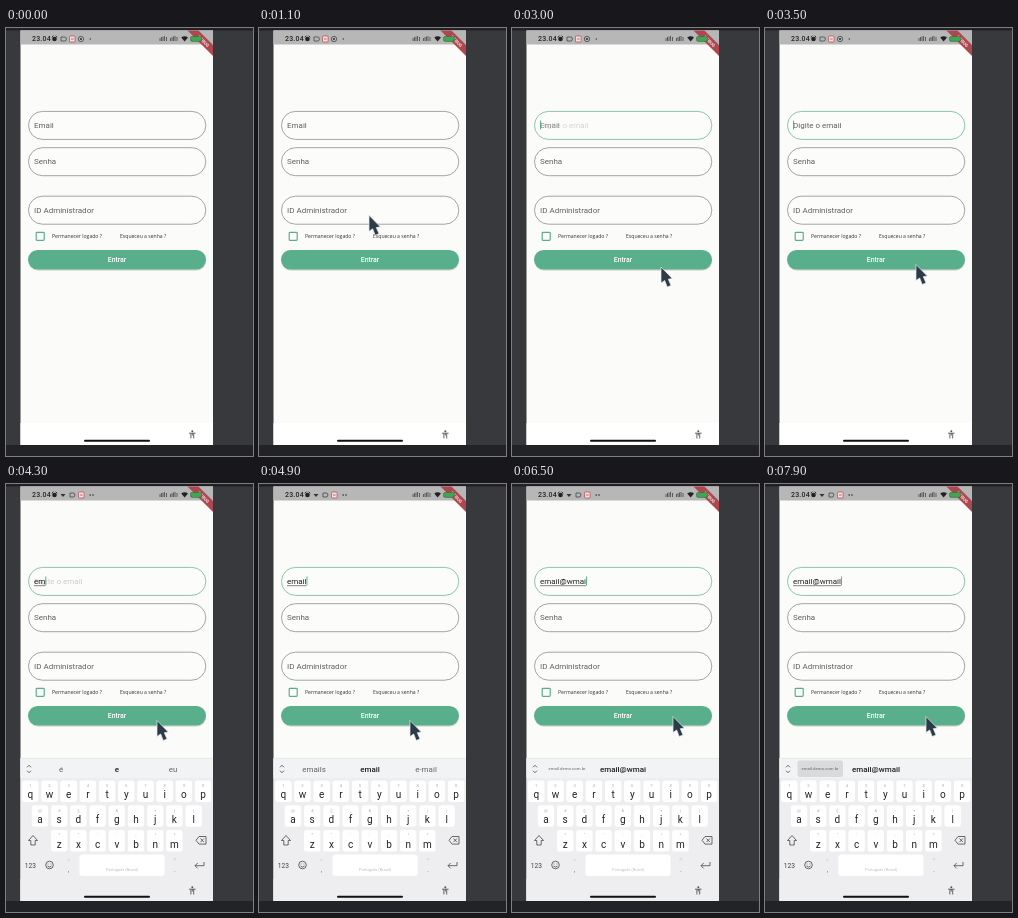
Write an HTML page that moves like this. It is 247 px wide and 428 px high and loops after 8000 ms.

```html
<!DOCTYPE html>
<html lang="pt">
<head>
<meta charset="utf-8">
<style>
html, body { margin: 0; width: 100%; height: 100%; overflow: hidden; background: #38393c; }
svg { display: block; width: 247px; height: 428px; font-family: Roboto, Arial, sans-serif; }
text { white-space: pre; }
.mid { text-anchor: middle; }
.line { fill: none; stroke: #45474a; stroke-width: .8; }
</style>
</head>
<body>
<svg viewBox="0 0 247 428">
  <defs><clipPath id="screen"><rect x="14.5" y="2.5" width="192.5" height="414.5"/></clipPath></defs>
  <rect width="247" height="428" fill="#38393c"/>
  <rect width="247" height="2.5" fill="#202124"/>
  <rect y="417" width="247" height="11" fill="#222326"/>
  <g clip-path="url(#screen)">
    <rect x="14" y="2" width="193" height="416" fill="#fbfbf9"/>
    <rect x="14" y="395" width="193" height="23" fill="#fff"/>
    <rect x="14" y="2" width="193" height="14.5" fill="#b7b7b7"/>
    <text x="26" y="13" font-size="7" font-weight="500" fill="#222" letter-spacing=".2">23.04</text>
    <g fill="#222">
      <circle cx="48.5" cy="11" r="2.3"/>
      <path d="M45.8 9.3l1.6-1.5M51.2 9.3l-1.6-1.5" stroke="#222"/>
    </g>
    <g id="iconsA">
      <path class="line" d="M55 9h4.5l1 2-1 2H55z"/>
      <rect x="63.5" y="8" width="5.6" height="6" rx=".8" fill="#f3dcdc" stroke="#b4494e" stroke-width=".7"/>
      <path d="M65 11h2.6" stroke="#b4494e" stroke-width=".8"/>
      <circle class="line" cx="75" cy="11" r="2.7"/><circle cx="75" cy="11" r="1.1" fill="#333"/>
      <circle cx="84.3" cy="11" r=".8" fill="#444"/>
    </g>
    <g id="iconsB">
      <path d="M54.5 10h5l-2.5 3z" fill="#333"/>
      <path class="line" d="M64 9h4l1 2-1 2h-4z"/>
      <rect x="72.5" y="8" width="5.6" height="6" rx=".8" fill="#f3dcdc" stroke="#b4494e" stroke-width=".7"/>
      <path d="M74 11h2.6" stroke="#b4494e" stroke-width=".8"/>
      <path d="M83.5 11h1.4m1.4 0h1.4" stroke="#444" stroke-width="1.4"/>
    </g>
    <path d="M154 13v-3m1.5 3v-4m1.5 4v-4.5m1.5 4.5v-5m2 5v-4M164.5 13v-3m1.5 3v-4m1.5 4v-4.5m1.5 4.5v-5m2 5v-4" stroke="#444" stroke-width=".8"/>
    <path d="M175.2 9.6q3.4-2.8 6.8 0l-3.4 4z" fill="#222"/>
    <path d="M181 2h11l15 15v11z" fill="#ad4750"/>
    <text class="mid" transform="translate(197.5 13.2) rotate(45)" y="1.6" font-size="4.5" font-weight="700" fill="#f0dede">DEBUG</text>
    <rect x="184.5" y="8.4" width="11" height="5" rx="1.6" fill="#43a452" stroke="#2d5a35" stroke-width=".5"/>

    <g id="fields"></g>
    <g font-size="8" fill="#5f6162">
      <text id="label" x="28" y="100">Email</text>
      <text id="hint" x="28" y="100">Digite o email</text>
      <text x="28" y="136.3">Senha</text>
      <text x="28" y="184.8">ID Administrador</text>
      <text id="typed" x="28" y="100" fill="#222"></text>
    </g>
    <path id="underline" stroke="#333" stroke-width=".6"/>
    <path id="caret" stroke="#4fa684" stroke-width=".9"/>
    <rect x="30.2" y="204.3" width="8" height="8" rx=".8" fill="#fff" stroke="#58ae8b" stroke-width="1.2"/>
    <g font-family="'Open Sans', Arial, sans-serif" font-size="5.1" fill="#333">
      <text x="46" y="210.3">Permanecer logado ?</text>
      <text x="114" y="210.3">Esqueceu a senha ?</text>
    </g>
    <rect x="22.5" y="223.5" width="177.5" height="19.3" rx="9.6" fill="#000" opacity=".14"/>
    <rect x="22" y="222" width="178" height="19.5" rx="9.7" fill="#59ae8b"/>
    <text class="mid" x="111" y="234.4" font-size="6.9" font-weight="500" fill="#fff">Entrar</text>

    <g id="keyboard">
      <rect x="14" y="274" width="193" height="144" fill="#eeeef0"/>
      <rect x="14" y="274" width="193" height="20" fill="#f2f3f4"/>
      <path d="M14 274.3h193" stroke="#dcdddf" stroke-width=".6"/>
      <path class="line" d="M21 283.3l2-2 2 2m-4 3.4l2 2 2-2"/>
      <rect id="pick" x="32.5" y="276.5" width="45.5" height="16.5" rx="2" fill="#d9dadc"/>
      <g class="mid" font-size="8">
        <text id="left" x="55" fill="#666"></text>
        <text id="center" x="111" y="287.6" font-weight="500" fill="#222"></text>
        <text id="right" x="167" y="287.6" fill="#666"></text>
      </g>
      <g id="keys"></g>
      <path class="line" d="M27 351.5l4.5 5h-2.3v4.5h-4.4v-4.5h-2.3z"/>
      <path class="line" d="M190 356.3l3-3.8h7v7.6h-7zM194.5 354.5l3.4 3.6m0-3.6l-3.4 3.6"/>
      <text class="mid" x="24.3" y="383.8" font-size="6.6" fill="#444">123</text>
      <circle class="line" cx="43.5" cy="381" r="3.8"/>
      <path class="line" d="M41.5 382q2 2.2 4 0M42.1 379.6v.8m2.8-.8v.8"/>
      <rect x="73.5" y="370.5" width="85" height="21.5" rx="3" fill="#fff"/>
      <text class="mid" x="116" y="387" font-size="4" fill="#bbb">Português (Brasil)</text>
      <g class="mid" font-size="7" fill="#777"><text x="62.5" y="388">,</text><text x="169" y="388">.</text></g>
      <g class="mid" font-size="4" fill="#bbb"><text x="62.5" y="377">☺</text><text x="169" y="377">!?</text></g>
      <path class="line" d="M198 378v3.7h-9m2.7-2.7l-2.7 2.7 2.7 2.7"/>
      <g id="popup">
        <rect x="34" y="271.5" width="19" height="47" rx="3" fill="#fff" stroke="#d5d6d8" stroke-width=".5"/>
        <text class="mid" x="43.5" y="288" font-size="11" fill="#222">w</text>
      </g>
    </g>
    <path d="M79 412.7h64" stroke="#111" stroke-width="2" stroke-linecap="round"/>
    <circle cx="186.3" cy="403.2" r="1" fill="#555"/>
    <path d="M183 405.2h6.6M186.3 405v2.5m-1.4 3v-5m2.8 5v-5" fill="none" stroke="#555" stroke-width=".9"/>
  </g>
  <path id="cursor" d="M0 0V16L3.7 13.5 6.2 20 10 18.5 7.3 12.2 11.3 11.5Z" fill="#2d3b49" stroke="#e9eeee" stroke-width=".7" stroke-linejoin="round"/>
</svg>
<script>
const LOOP = 8000, STEP = 100;
const el = id => document.getElementById(id);

const field = (y, id = '') =>
  `<rect id="${id}" x="22.5" y="${y}" width="177.3" height="28" rx="14" fill="#fcfdfb" stroke="#85888a" stroke-width=".75"/>`;
el('fields').innerHTML = field(83.4, 'email') + field(119.7) + field(168.2);

const rows = [
  ['qwertyuiop', '1234567890', 24.3, 296.5],
  ['asdfghjkl', '@#$_&-+()', 34, 321.3],
  ['zxcvbnm', '*"\':;!?', 53.2, 346]
];
el('keys').innerHTML = rows.map(([letters, marks, x0, y]) => [...letters].map((c, i) => {
  const x = x0 + i * 19.2;
  return `<rect x="${x - 8.2}" y="${y}" width="16.4" height="21.5" rx="2.8" fill="#fff"/>
    <text class="mid" x="${x}" y="${y + 6.2}" font-size="4.2" fill="#aaa">${marks[i]}</text>
    <text class="mid" x="${x}" y="${y + 17.5}" font-size="10" fill="#222">${c}</text>`;
}).join('')).join('');

// time, x, y of the pointer tip
const path = [[700, 50, 0], [1000, 90, 150], [1300, 150, 262], [1400, 184, 266], [1500, 173, 246],
  [1600, 155, 239], [1700, 149, 239], [3000, 149, 239], [3300, 151, 236.5], [6000, 151, 236.5], [6300, 161, 232.5]];

// time, typed text, suggestions
const typing = [
  [0, '', 'o', 'is', 'e'],
  [4300, 'em', 'é', 'e', 'eu'],
  [4500, 'ema', 'em', 'ema', 'emas'],
  [4700, 'emai', 'ema', 'emai', 'email'],
  [4900, 'email', 'emails', 'email', 'e-mail'],
  [5300, 'email@', 'o', 'is', 'e'],
  [6100, 'email@w', '', 'email@w', ''],
  [6300, 'email@wm', '', 'email@wm', ''],
  [6500, 'email@wmai', 'email.demo.com.br', 'email@wmai', ''],
  [6700, 'email@wmail', 'email.demo.com.br', 'email@wmail', '']
];

const ramp = (t, a, b) => Math.min(1, Math.max(0, (t - a) / (b - a)));
const lastAt = (list, t) => list.filter(k => k[0] <= t).pop();
const show = (id, on) => el(id).setAttribute('opacity', +on);

function pointerAt(t) {
  const a = lastAt(path, t) || path[0];
  const b = path[path.indexOf(a) + 1] || a;
  const p = a === b ? 0 : ramp(t, a[0], b[0]);
  return [a[1] + (b[1] - a[1]) * p, a[2] + (b[2] - a[2]) * p];
}

function render(t) {
  show('cursor', t >= 700);
  el('cursor').setAttribute('transform', `translate(${pointerAt(t)})`);

  const focused = t >= 3000;
  el('email').setAttribute('stroke', focused ? '#67b293' : '#85888a');
  show('label', 1 - ramp(t, 2900, 3200));
  show('hint', t < 4300 ? ramp(t, 2900, 3300) : t < 4500 ? .3 : 0);

  const [, text, left, center, right] = lastAt(typing, t);
  el('typed').textContent = text;
  const end = 28 + (text ? el('typed').getComputedTextLength() : 0);
  el('caret').setAttribute('d', `M${end + .5} 92.5v9`);
  show('caret', focused && !(t >= 3900 && t < 4300));
  el('underline').setAttribute('d', `M28 101.7H${end}`);
  show('underline', text && !text.endsWith('@'));

  const longLeft = left.length > 8;
  el('left').textContent = left;
  el('left').setAttribute('font-size', longLeft ? 4.3 : 8);
  el('left').setAttribute('y', longLeft ? 286.3 : 287.6);
  el('center').textContent = center;
  el('right').textContent = right;

  show('keyboard', t >= 3600);
  el('keyboard').setAttribute('transform', `translate(0 ${t < 3700 ? 60 : 0})`);
  show('popup', t >= 5900 && t < 6100);
  show('pick', t >= 7900);
  show('iconsA', t < 3600);
  show('iconsB', t >= 3600);
}

const start = performance.now();
function frame() {
  const t = (performance.now() - start) % LOOP;
  render(Math.floor(t / STEP) * STEP);
  requestAnimationFrame(frame);
}
frame();
</script>
</body>
</html>
```
